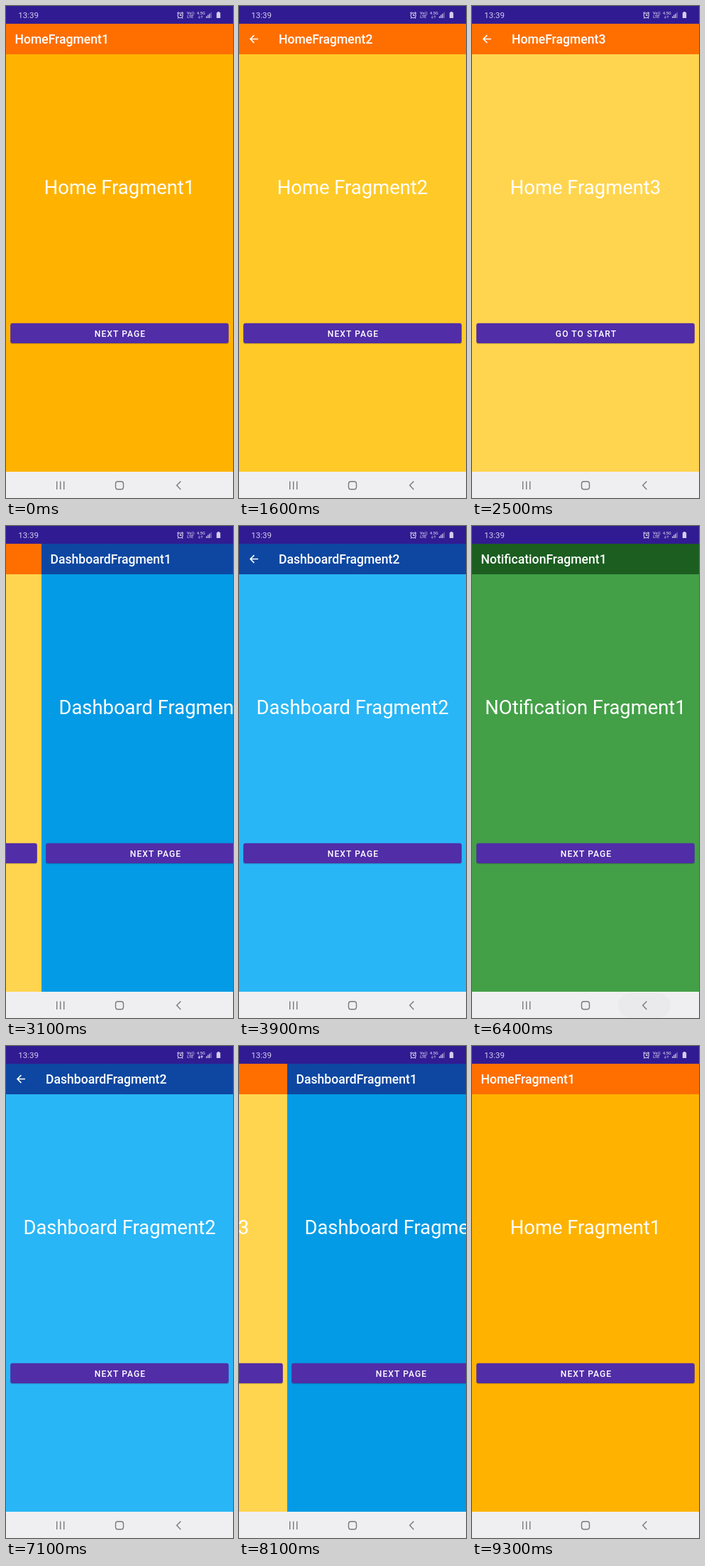
Recreate the animation shown at these times as an HTML page. Size 320x693 px, loop 9.4 s.

```html
<!DOCTYPE html>
<html lang="en">
<head>
<meta charset="utf-8">
<title>Fragment pager</title>
<style>
  html, body { margin: 0; width: 100%; height: 100%; overflow: hidden; }
  svg { display: block; width: 320px; height: 693px; font-family: Roboto, sans-serif; }
  text { fill: #fff; }
  .title { font-size: 17.6px; font-weight: 500; }
  .label { font-size: 27.4px; text-anchor: middle; }
  .button { font-size: 12.1px; font-weight: 500; letter-spacing: .0892em; text-anchor: middle; }
  .line { fill: none; stroke: #fff; stroke-width: 1.6; }
  .status text, .status .fill { fill: #d3cdec; }
  .status .line { stroke: #d3cdec; stroke-width: 1.1; }
  .nav { fill: none; stroke: #7a7a7d; stroke-width: 1.4; }
</style>
</head>
<body>
<svg viewBox="0 0 320 693">
  <g id="track"></g>
  <g class="status">
    <rect width="320" height="25" fill="#311b92"/>
    <text x="17.3" y="17" font-size="11.5">13:39</text>
    <g class="line">
      <circle cx="245.7" cy="13.2" r="3.5"/>
      <path d="M245.7 11v2.4h2M241.3 10.4l2.2-2M250.1 10.4l-2.2-2M243.2 16.4l-1 1.2M248.2 16.4l1 1.2"/>
    </g>
    <g font-size="5.6" font-weight="500">
      <text x="255" y="11.6">Vo))</text>
      <text x="255.2" y="17.4">LTE</text>
      <text x="269" y="12">4.5G</text>
    </g>
    <path id="data" class="line" d="M272.4 13.6v3.4M271 15.7l1.4 1.4 1.4-1.4M276 17.2v-3.4M274.6 15.1l1.4-1.4 1.4 1.4"/>
    <path class="fill" d="M282 14.5h1.3V17H282zM284.2 12.6h1.3V17h-1.3zM286.4 10.7h1.3V17h-1.3z"/>
    <path class="fill" opacity=".45" d="M288.6 8.8h1.3V17h-1.3z"/>
    <path class="fill" d="M298.2 8h2.6v1.2h1.4V17h-5.4V9.2h1.4z"/>
  </g>
  <rect y="656" width="320" height="37" fill="#efeff1"/>
  <rect id="ripple" x="206" y="658" width="74" height="35" rx="17.5" fill="#000"/>
  <g class="nav">
    <path d="M71.7 669.5v11.5M76.7 669.5v11.5M81.7 669.5v11.5"/>
    <rect x="154.5" y="669.7" width="11" height="11" rx="3.2"/>
    <path d="M246.3 669.6l-5.6 5.7 5.6 5.7"/>
  </g>
</svg>
<script>
const LOOP = 9400, WIDTH = 320;

const tabs = [
  { key: 'home', name: 'Home', bar: '#ff6f00', fills: ['#ffb300', '#ffca28', '#ffd54f'] },
  { key: 'dash', name: 'Dashboard', bar: '#0d47a1', fills: ['#039be5', '#29b6f6', '#4fc3f7'] },
  { key: 'note', name: 'Notification', label: 'NOtification', bar: '#1b5e20', fills: ['#43a047', '#66bb6a', '#81c784'] }
];

// Each step lists what changes from its time on; x is the pager scroll.
const steps = [
  [0, { x: 0, home: 1, dash: 1, note: 1, press: 0, ripple: 0, data: .5 }],
  [1500, { press: .14 }],
  [1600, { home: 2, press: 0 }],
  [2400, { home: 3 }],
  [3000, { x: 110 }], [3100, { x: 270 }], [3200, { x: 320 }],
  [3800, { dash: 2 }],
  [4400, { x: 430 }], [4500, { x: 590 }], [4600, { x: 640 }],
  [5100, { note: 2 }],
  [6000, { ripple: .08 }],
  [6100, { note: 1 }],
  [6200, { ripple: .06 }], [6300, { ripple: .04 }], [6400, { ripple: .02 }], [6500, { ripple: 0 }],
  [6600, { x: 572 }], [6700, { x: 415 }], [6800, { x: 338 }], [6900, { x: 320 }],
  [7000, { data: 1 }],
  [7500, { dash: 1, data: .5 }],
  [8100, { x: 252 }], [8200, { x: 95 }], [8300, { x: 18 }], [8400, { x: 0 }],
  [9200, { press: .14 }],
  [9300, { home: 1, press: 0 }]
];

function page(tab, n) {
  const back = n > 1;
  return `<g data-page="${tab.key}${n}">
    <rect y="25" width="320" height="631" fill="${tab.fills[n - 1]}"/>
    <rect y="25" width="320" height="43" fill="${tab.bar}"/>
    ${back ? '<path class="line" d="M27 46.5H16.2M21.4 41.1L16 46.5l5.4 5.4"/>' : ''}
    <text class="title" x="${back ? 55.9 : 12.4}" y="53">${tab.name}Fragment${n}</text>
    <text class="label" x="160" y="265.3">${tab.label || tab.name} Fragment${n}</text>
    <rect x="6" y="448" width="308" height="28.2" rx="3.2" opacity=".2"/>
    <rect x="6.2" y="446.8" width="307.6" height="28.2" rx="3" fill="#512da8"/>
    <rect class="press" x="6.2" y="446.8" width="307.6" height="28.2" rx="3" fill="#fff" opacity="0"/>
    <text class="button" x="161" y="465.6">${n < 3 ? 'NEXT PAGE' : 'GO TO START'}</text>
  </g>`;
}

const $ = id => document.getElementById(id);
const track = $('track');
track.innerHTML = tabs.map((tab, i) =>
  `<g transform="translate(${i * WIDTH})">${[1, 2, 3].map(n => page(tab, n)).join('')}</g>`).join('');
const pages = [...track.querySelectorAll('[data-page]')];
const presses = track.querySelectorAll('.press');

function draw(t) {
  const s = Object.assign({}, ...steps.filter(([at]) => at <= t).map(([, change]) => change));
  track.setAttribute('transform', `translate(${-s.x})`);
  const shown = tabs.map(({ key }) => key + s[key]);
  for (const p of pages) p.style.display = shown.includes(p.dataset.page) ? '' : 'none';
  for (const p of presses) p.setAttribute('opacity', s.press);
  $('ripple').setAttribute('opacity', s.ripple);
  $('data').setAttribute('opacity', s.data);
}

const start = performance.now();
function tick() {
  draw((performance.now() - start) % LOOP);
  requestAnimationFrame(tick);
}
tick();
</script>
</body>
</html>
```
